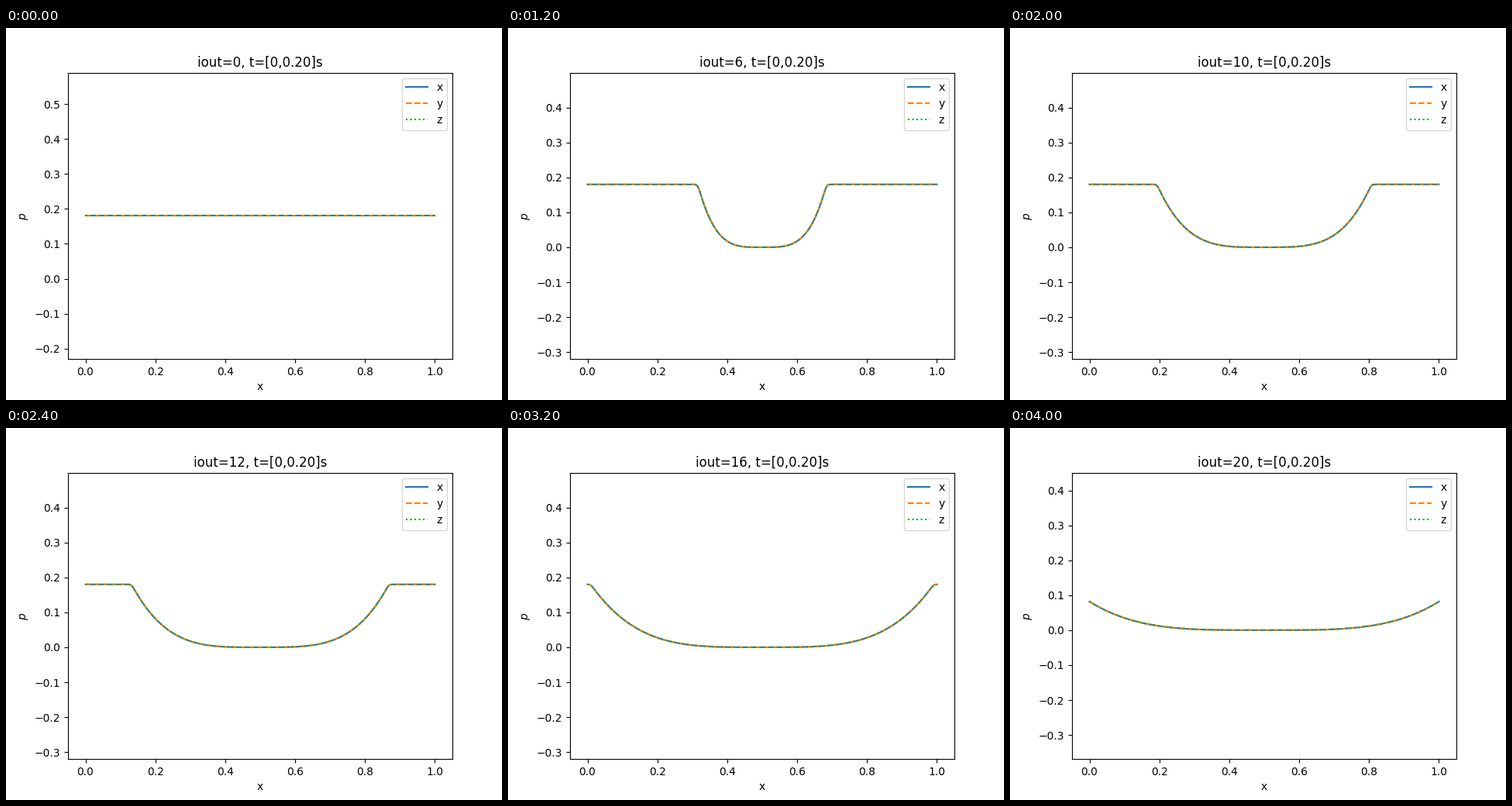
Recreate the animation shown at these times as a matplotlib script. Size 640 px wide and 480 px high, loop 4.2 s.

```python
import numpy as np
import matplotlib.pyplot as plt
from matplotlib.animation import FuncAnimation

FRAMES = 21
INTERVAL = 200
DT = 0.01           # simulated time per output
P0 = 0.18           # undisturbed pressure
HEAD_SPEED = 3.067  # speed of the rarefaction front
FAN_SPEED = 3.177   # velocity range over which the pressure falls to zero
CORNER = 0.0025     # smearing width of the front
HALF_HEIGHT = 0.55 * 369.6 / 496  # equal scaling on both axes

x = np.linspace(0, 1, 257)


def pressure(step):
    """Two rarefaction waves running apart from the middle."""
    if step == 0:
        return np.full_like(x, P0)
    t = step * DT
    inside = (HEAD_SPEED * t - np.abs(x - 0.5)) / CORNER
    depth = CORNER * np.logaddexp(0, inside)
    fan = P0 * np.clip(1 - depth / (FAN_SPEED * t), 0, 1) ** 4
    floor = 0.007 / step ** 3
    return np.minimum(np.hypot(fan, floor), P0)


fig, ax = plt.subplots(figsize=(6.4, 4.8), dpi=100)
lines = [ax.plot(x, pressure(0), style, label=name)[0]
         for name, style in (("x", "-"), ("y", "--"), ("z", ":"))]
ax.set_xlim(-0.05, 1.05)
ax.set_xlabel("x")
ax.set_ylabel("$p$")
ax.legend(loc="upper right")


def draw(step):
    p = pressure(step)
    for line in lines:
        line.set_ydata(p)
    middle = (p.min() + p.max()) / 2
    ax.set_ylim(middle - HALF_HEIGHT, middle + HALF_HEIGHT)
    ax.set_title(f"iout={step}, t=[0,0.20]s")
    return lines


anim = FuncAnimation(fig, draw, frames=FRAMES, interval=INTERVAL,
                     init_func=lambda: draw(0), repeat=True, repeat_delay=0)
plt.show()
```
